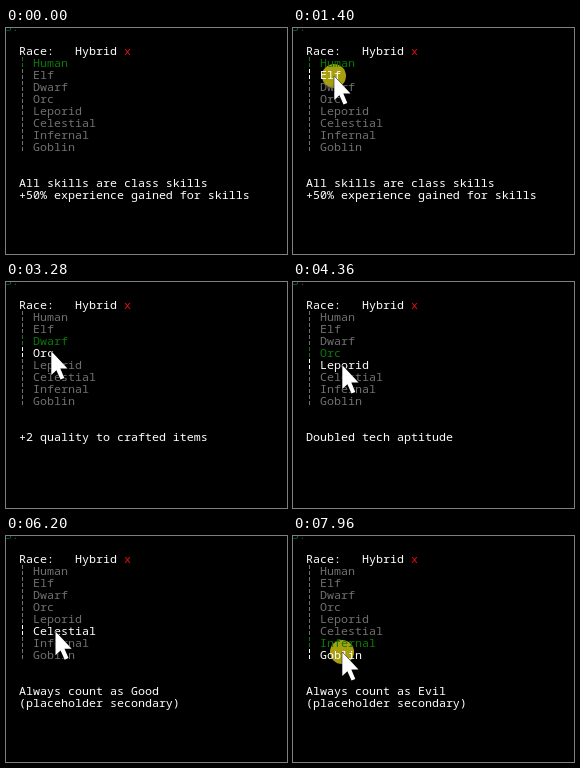
Write an HTML page that moves like this. It is 281 by 226 pixels and loops after 8000 ms.

```html
<!DOCTYPE html>
<html lang="en">
<head>
<meta charset="utf-8">
<title>Race menu</title>
<style>
  html, body { margin: 0; width: 100%; height: 100%; overflow: hidden; background: #000; }
  svg { display: block; width: 100%; height: 100%; }
  text { font: 11.667px "Noto Sans Mono", "Liberation Mono", monospace; white-space: pre; }
</style>
</head>
<body>
<svg id="stage" viewBox="0 0 281 226">
  <circle id="halo" r="12" fill="#a89f10"/>
  <path id="cursor" d="M.3 .3V24L5.4 19.2L9.5 28.5L13.3 26.9L9.3 17.6H16.5Z"
        fill="#fff" stroke="#000" paint-order="stroke"/>
</svg>
<script>
const LOOP = 8000, TICK = 40;
const LEFT = 13, CELL = 7, LINE = 12, LIST_TOP = 29, NOTES_TOP = 150;
const DIM = '#707070', GREEN = '#087808', WHITE = '#fff';
const ENTRY = [123, 104];

// at: where the pointer rests, reached at `arrive` and pressed at `press`
const races = [
  { name: 'Human', notes: ['All skills are class skills', '+50% experience gained for skills'] },
  { name: 'Elf', notes: ['Doubled magic aptitude'], at: [41, 48], arrive: 1040, press: 1400 },
  { name: 'Dwarf', notes: ['+2 quality to crafted items'], at: [44, 58], arrive: 1960, press: 2640 },
  { name: 'Orc', notes: ['Doubled tech aptitude'], at: [45, 69], arrive: 3040, press: 3840 },
  { name: 'Leporid', notes: ['Doubled Taming for taming insects'], at: [49, 83], arrive: 4360, press: 4880, hold: 120 },
  { name: 'Celestial', notes: ['Always count as Good', '(placeholder secondary)'], at: [49, 94], arrive: 5400, press: 5960 },
  { name: 'Infernal', notes: ['Always count as Evil', '(placeholder secondary)'], at: [51, 107], arrive: 6440, press: 7000, hold: 120 },
  { name: 'Goblin', notes: [], at: [49, 116], arrive: 7520, press: 7960 }
];

// Longer glides take longer.
const visits = races.slice(1).map((race, i) => {
  const from = i ? races[i].at : ENTRY;
  const distance = Math.hypot(race.at[0] - from[0], race.at[1] - from[1]);
  const duration = 210 + 3.2 * distance;
  const release = race.press + (race.hold || TICK);
  return { ...race, from, duration, start: race.arrive - duration, release };
});

const stage = document.getElementById('stage');
const halo = document.getElementById('halo');
const cursor = document.getElementById('cursor');

function add(tag, attrs, content = '') {
  const node = document.createElementNS('http://www.w3.org/2000/svg', tag);
  for (const key in attrs) node.setAttribute(key, attrs[key]);
  node.textContent = content;
  stage.insertBefore(node, cursor);
  return node;
}

const label = (column, top, content, fill = WHITE) =>
  add('text', { x: LEFT + column * CELL, y: top + 9.7, fill }, content);

label(-2, -7, 'S:', '#0b5a2c');
label(0, LIST_TOP - LINE, 'Race:');
label(8, LIST_TOP - LINE, 'Hybrid');
label(15, LIST_TOP - LINE, 'x', '#e01010');

const rows = races.map(({ name }, i) => {
  const top = LIST_TOP + i * LINE;
  return [add('path', { d: `M16 ${top}h1v4h-1zm0 6h1v4h-1z` }), label(2, top, name)];
});
const notes = [0, 1].map(i => label(0, NOTES_TOP + i * LINE - 1, ''));

function pointerAt(t) {
  const visit = visits.filter(v => t >= v.start).pop();
  if (!visit) return null;
  const progress = Math.min(1, (t - visit.start) / visit.duration);
  const eased = progress * (2 - progress);
  return visit.from.map((p, i) => p + (visit.at[i] - p) * eased);
}

function hoveredRow([x, y]) {
  const i = Math.floor((y - LIST_TOP) / LINE);
  return races[i] && x < LEFT + (races[i].name.length + 2) * CELL ? i : -1;
}

function draw(t) {
  const pointer = pointerAt(t);
  const hovered = pointer ? hoveredRow(pointer) : -1;
  const pressed = visits.some(v => t >= v.press && t < v.release);
  const chosen = visits.filter(v => t >= v.release).length;

  rows.forEach((parts, i) => {
    const color = i === hovered ? WHITE : i === chosen ? GREEN : DIM;
    parts.forEach(part => part.setAttribute('fill', color));
  });
  notes.forEach((note, i) => { note.textContent = races[chosen].notes[i] || ''; });

  if (pointer) {
    const place = `translate(${pointer})`;
    cursor.setAttribute('transform', place);
    halo.setAttribute('transform', place);
  }
  cursor.style.display = pointer ? '' : 'none';
  halo.style.display = pressed ? '' : 'none';
}

const begin = performance.now();
function tick() {
  const t = (performance.now() - begin) % LOOP;
  draw(Math.floor(t / TICK) * TICK);
  requestAnimationFrame(tick);
}
tick();
</script>
</body>
</html>
```
